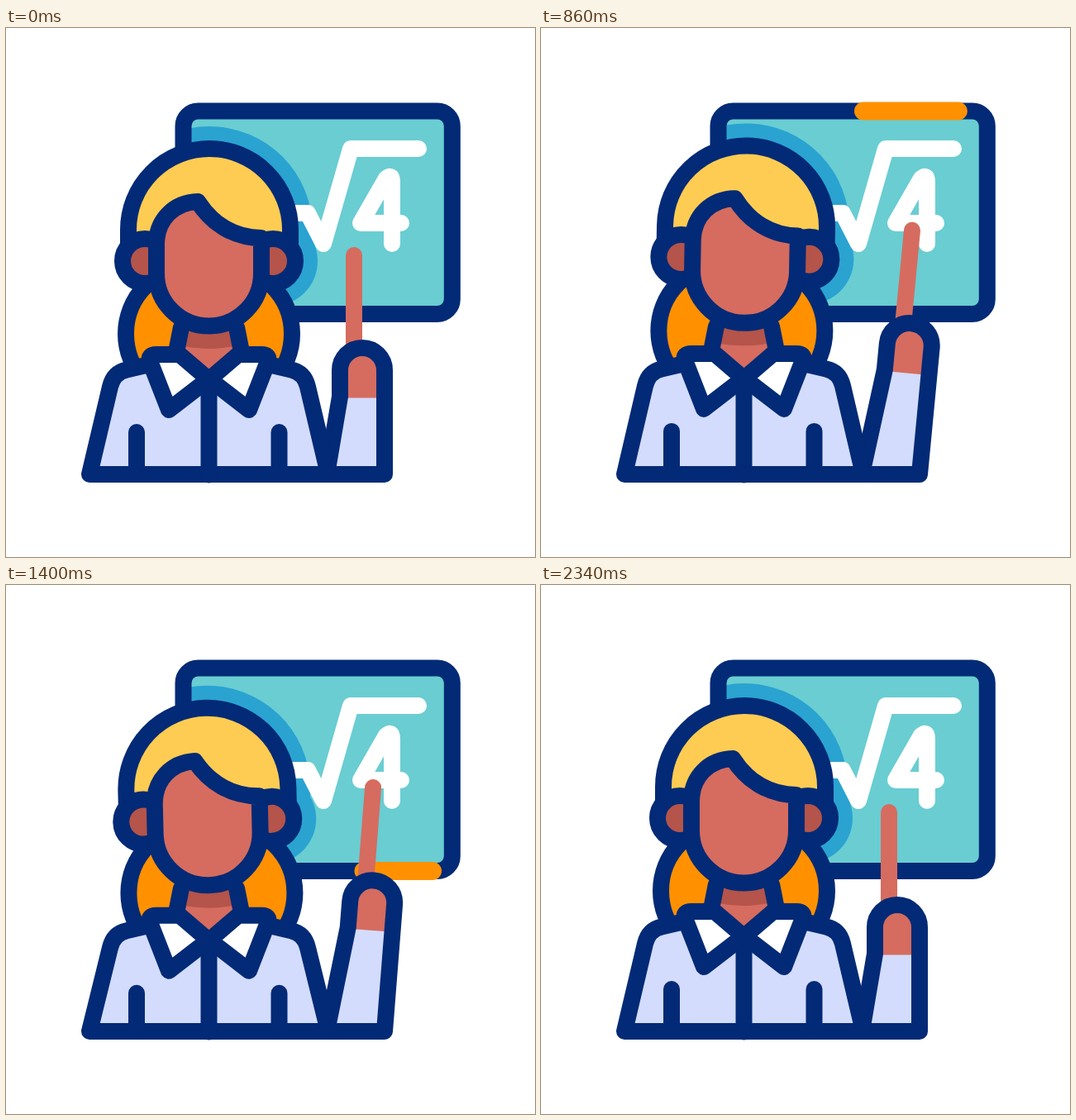
Animation of 640 by 640 pixels, one loop 2.48 s. Source, as an HTML page:

```html
<!DOCTYPE html>
<html lang="en">
<head>
<meta charset="utf-8">
<title>Maths teacher</title>
<style>
  html, body { margin: 0; width: 100%; height: 100%; overflow: hidden; background: #fff; }
  svg { display: block; width: 100vw; height: 100vh; }
  .line { fill: none; stroke: #032a76; stroke-width: 20; stroke-linecap: round; stroke-linejoin: round; }
  .skin { fill: #d56c5f; }
  .shade { fill: #b4544a; }
  .blonde { fill: #fecc52; }
  .orange { fill: #ff9100; }
  .cloth { fill: #d3dcfd; }
  .white { fill: #fff; }
  .teal { fill: #69cdd2; }
  .cast { fill: #2aa3d1; }
  .chalk { stroke: #fff; }
  .stick { stroke: #d56c5f; }
  .runner { stroke: #ff9100; stroke-width: 22; }
</style>
</head>
<body>
<svg viewBox="0 0 640 640">
  <defs>
    <clipPath id="inside"><rect x="214.5" y="100.5" width="325.3" height="245.5" rx="18"/></clipPath>
    <clipPath id="neckClip"><path id="neck" d="M211 340L206 395L245.5 425L285 395L280 340Z"/></clipPath>
    <path id="collar" d="M182 395H210L245 425L197 462L174 403Q172 395 182 395Z"/>
  </defs>

  <g clip-path="url(#inside)">
    <rect class="teal" width="640" height="640"/>
    <g class="cast head">
      <circle cx="246" cy="244" r="125"/>
      <circle cx="323" cy="282" r="54"/>
    </g>
  </g>
  <rect class="line" x="214.5" y="100.5" width="325.3" height="245.5" rx="18"/>
  <path id="runner" class="line runner" d="M214.5 172V118.5A18 18 0 0 1 232.5 100.5H521.8A18 18 0 0 1 539.8 118.5V328A18 18 0 0 1 521.8 346H300"/>
  <path class="line chalk" d="M345 224H365L384 261L417 146H499"/>
  <path class="line chalk" d="M478 236H429L460 182Q467 176 467 186V261"/>

  <g id="arm">
    <path id="stick" class="line stick" d="M421 275V400"/>
    <path id="sleeve" class="cloth"/>
    <path id="hand" class="skin" d="M404 447.5V414A27 27 0 0 1 458 414V447.5Z"/>
    <path id="armLine" class="line"/>
  </g>

  <path id="hair" class="line orange" d="M227 288A82 82 0 0 0 227 452H264A82 82 0 0 0 264 288Z"/>

  <g class="upper">
    <use href="#neck" class="skin"/>
    <g clip-path="url(#neckClip)">
      <path id="chinShade" class="shade" d="M195 330H296V380Q245.5 396 195 380Z"/>
    </g>
    <path class="line" d="M212 362L206 392M279 362L285 392"/>
  </g>
  <path id="shirt" class="line cloth"/>
  <g class="upper">
    <path class="skin" d="M206 390L245.5 424L285 390Z"/>
    <path class="line" d="M158 489V532M330.5 489V532M245.5 425V532"/>
    <use href="#collar" class="line white"/>
    <use href="#collar" class="line white" transform="matrix(-1 0 0 1 491 0)"/>
  </g>
  <path class="line" d="M245.5 540V540.5"/>

  <g class="head">
    <path class="line blonde" d="M148 262V244A98 98 0 0 1 344 244V262Z"/>
    <circle class="line shade" cx="168" cy="282" r="27"/>
    <circle class="line shade" cx="323" cy="282" r="27"/>
    <path class="line skin" d="M182 262C182 232 203 211 232 210C250 238 277 254 309 254V297A63.5 63.5 0 0 1 182 297Z"/>
  </g>
</svg>

<script>
  const LOOP = 2480, START = 300, BEAT = 340;
  const TRACK = 841;  // length of the board edge the orange line runs along

  const all = selector => document.querySelectorAll(selector);
  const set = (selector, name, value) => all(selector).forEach(el => el.setAttribute(name, value));

  const part = (t, from, to) => Math.min(1, Math.max(0, (t - from) / (to - from)));
  const ease = u => (1 - Math.cos(Math.PI * u)) / 2;
  const easeOut = u => 1 - (1 - u) ** 2;

  // Eases from one pose to the next on every beat, resting at both ends
  function sway(t, poses) {
    const beat = Math.max(0, (t - START) / BEAT), i = Math.floor(beat);
    const from = poses[i - 1] || 0, to = poses[i] || 0;
    return from + (to - from) * ease(beat - i);
  }

  function shirtPath(dy) {
    const y = v => v + dy;
    return `M101 540L126 ${y(434)}Q130 ${y(417)} 146 ${y(413.5)}L178 ${y(406)}H313` +
      `L345 ${y(413.5)}Q361 ${y(417)} 365 ${y(434)}L390 540Z`;
  }

  // Arm in its own turned space; the left foot stays put on the stage
  function armPath(turn, lift) {
    const a = turn * Math.PI / 180;
    const footX = 458 - 70 * Math.cos(a), footY = 540 + 70 * Math.sin(a);
    return `M${footX} ${footY}L404 ${446 - lift}V${414 - lift}A27 27 0 0 1 458 ${414 - lift}V540Z`;
  }

  function drawBody(t) {
    const swing = sway(t, [5.8, -5.8, 4.5, -3.6, 3.2]);
    const headY = sway(t, [8, -8, 3.6, -3.2, 5]);
    const bodyY = sway(t, [8, -4.5, 5.5, 0, 5.2]);

    set('.head', 'transform', `translate(0 ${headY}) rotate(${-0.4 * swing} 246 355)`);
    set('#hair', 'transform', `translate(${swing} ${headY})`);
    set('#chinShade', 'transform', `translate(0 ${headY - bodyY})`);
    set('.upper', 'transform', `translate(0 ${bodyY})`);
    set('#shirt', 'd', shirtPath(bodyY));
  }

  function drawArm(t) {
    const rise = ease(part(t, START, 660));
    const drop = ease(part(t, 1400, 1670));
    const settle = ease(part(t, 2020, 2340));
    const lift = 28 * rise - 30 * drop + 2 * settle;
    const lean = 5.8 - 1.3 * part(t, 660, 1400);
    const turn = lean * (rise - ease(part(t, 1400, 1850)));
    const lag = -2.3 * Math.sin(Math.PI * part(t, 1400, 2050));

    const outline = armPath(turn, lift);
    set('#arm', 'transform', `rotate(${turn} 458 540)`);
    set('#sleeve, #armLine', 'd', outline);
    set('#hand', 'transform', `translate(0 ${-lift})`);
    set('#stick', 'transform', `translate(0 ${-lift}) rotate(${lag} 421 385)`);
  }

  function drawRunner(t) {
    const tail = TRACK * easeOut(part(t, 630, 2130));
    const tip = TRACK * easeOut(part(t, 531, 1912));
    set('#runner', 'stroke-dasharray', `${Math.max(tip - tail, 0.01)} 2000`);
    set('#runner', 'stroke-dashoffset', -tail);
  }

  const start = performance.now();
  function tick() {
    const t = (performance.now() - start) % LOOP;
    drawBody(t);
    drawArm(t);
    drawRunner(t);
    requestAnimationFrame(tick);
  }
  tick();
</script>
</body>
</html>
```
